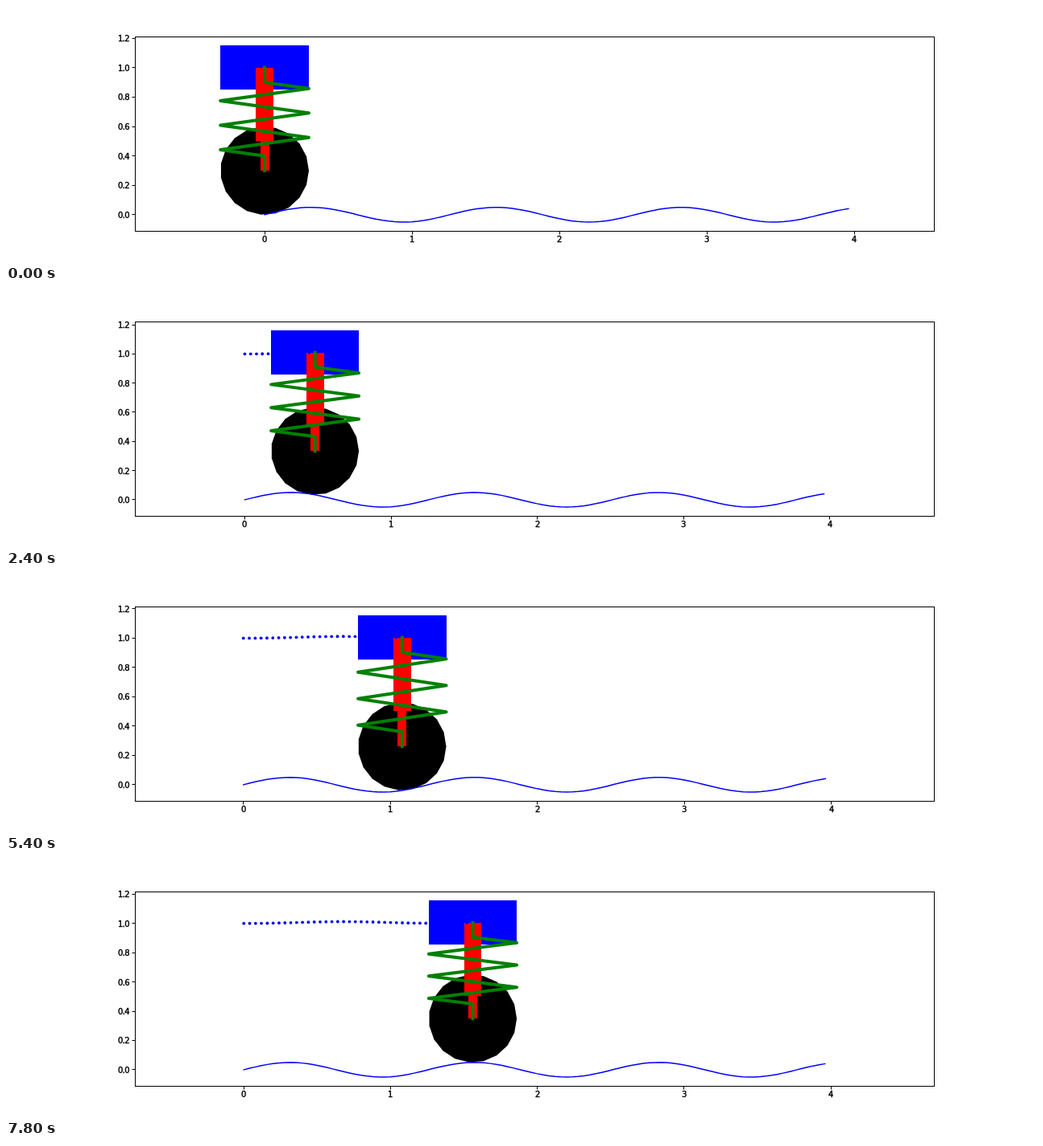
Animation, 1280 px wide and 320 px high, one loop 8 s. Source, as an HTML page with a canvas:

```html
<!DOCTYPE html>
<html lang="en">
<head>
<meta charset="utf-8">
<title>Wheel and spring on a wavy road</title>
<style>
  html, body { margin: 0; width: 100%; height: 100%; overflow: hidden; background: #fff; }
  canvas { display: block; }
</style>
</head>
<body>
<canvas id="stage" width="1280" height="320"></canvas>
<script>
const ctx = document.getElementById('stage').getContext('2d');
const LOOP = 8000, STEP = 200, DX = 0.04;
const BOX = { left: 160, right: 1152, top: 38.4, bottom: 280 };
const ROAD_MIN = -0.05, ROAD_END = 3.96, RADIUS = 0.3, WHEEL_SIDES = 19;

const road = x => 0.05 * Math.sin(5 * x);
const bodyHeight = x => 1 + 0.0058 * (1 - Math.cos(5 * x - 0.2)) + 0.0007 * x;
const snap = v => Math.floor(v) + 0.5;

// Equal-aspect view: the vertical data range sets the scale, x is centred.
function makeView(x, bodyY) {
  const span = bodyY + 0.15 - ROAD_MIN;
  const scale = (BOX.bottom - BOX.top) / (span * 1.1);
  const middle = (Math.min(0, x - RADIUS) + ROAD_END) / 2;
  return {
    px: v => (BOX.left + BOX.right) / 2 + (v - middle) * scale,
    py: v => BOX.bottom - (v - ROAD_MIN + span * 0.05) * scale
  };
}

function trace(points, view) {
  ctx.beginPath();
  for (const [x, y] of points) ctx.lineTo(view.px(x), view.py(y));
}

function strokeLine(points, view, color, width) {
  trace(points, view);
  ctx.strokeStyle = color;
  ctx.lineWidth = width;
  ctx.lineCap = 'square';
  ctx.lineJoin = 'round';
  ctx.stroke();
}

function block(view, x, halfWidth, low, high, color) {
  const left = Math.round(view.px(x - halfWidth)), right = Math.round(view.px(x + halfWidth));
  const top = Math.round(view.py(high)), bottom = Math.round(view.py(low));
  ctx.fillStyle = color;
  ctx.fillRect(left, top, right - left, bottom - top);
}

function springPoints(x, low, high) {
  const coil = (high - low - 0.2) / 6;
  const points = [[x, high], [x, high - 0.1]];
  for (let i = 0; i < 6; i++) {
    points.push([x + (i % 2 ? -0.3 : 0.3), high - 0.1 - (i + 0.5) * coil]);
  }
  return [...points, [x, low + 0.1], [x, low]];
}

function label(text, x, y, align) {
  ctx.textAlign = align;
  ctx.fillText(text, x, y);
  ctx.strokeText(text, x, y);
}

function drawAxes(view) {
  ctx.strokeStyle = ctx.fillStyle = '#000';
  ctx.lineCap = 'butt';
  ctx.lineJoin = 'miter';
  ctx.lineWidth = 1;
  ctx.strokeRect(160.5, 38.5, 992, 242);
  ctx.beginPath();
  for (let i = 0; i <= 4; i++) {
    const x = snap(view.px(i));
    ctx.moveTo(x, 281);
    ctx.lineTo(x, 284.5);
  }
  for (let i = 0; i <= 6; i++) {
    const y = snap(view.py(i / 5));
    ctx.moveTo(156.5, y);
    ctx.lineTo(160, y);
  }
  ctx.stroke();

  ctx.font = '10px "DejaVu Sans", sans-serif';
  ctx.letterSpacing = '-0.6px';
  ctx.textBaseline = 'alphabetic';
  ctx.lineWidth = 0.4;
  for (let i = 0; i <= 4; i++) label(String(i), Math.round(view.px(i)), 293.5, 'center');
  for (let i = 0; i <= 6; i++) label((i / 5).toFixed(1), 153, Math.round(view.py(i / 5)) + 4, 'right');
}

function draw(step) {
  const x = step * DX, bodyY = bodyHeight(x), hubY = RADIUS + road(x);
  const view = makeView(x, bodyY);
  ctx.fillStyle = '#fff';
  ctx.fillRect(0, 0, 1280, 320);

  block(view, x, 0.3, bodyY - 0.15, bodyY + 0.15, '#00f');
  trace(Array.from({ length: WHEEL_SIDES }, (_, i) => {
    const angle = i * 2 * Math.PI / WHEEL_SIDES;
    return [x + RADIUS * Math.cos(angle), hubY + RADIUS * Math.sin(angle)];
  }), view);
  ctx.fillStyle = '#000';
  ctx.fill();
  block(view, x, 0.06, bodyY - 0.5, bodyY, '#f00');
  block(view, x, 0.03, hubY, bodyY - 0.5, '#f00');

  strokeLine(Array.from({ length: 100 }, (_, i) => [i * DX, road(i * DX)]), view, '#00f', 1.5);

  ctx.fillStyle = '#00f';
  for (let i = 0; i <= step; i++) {
    ctx.beginPath();
    ctx.arc(view.px(i * DX), view.py(bodyHeight(i * DX)), 1.9, 0, 2 * Math.PI);
    ctx.fill();
  }

  strokeLine(springPoints(x, hubY, bodyY), view, '#008000', 4);
  drawAxes(view);
}

const start = performance.now();
function tick() {
  draw(Math.floor(((performance.now() - start) % LOOP) / STEP));
  requestAnimationFrame(tick);
}
tick();
</script>
</body>
</html>
```
